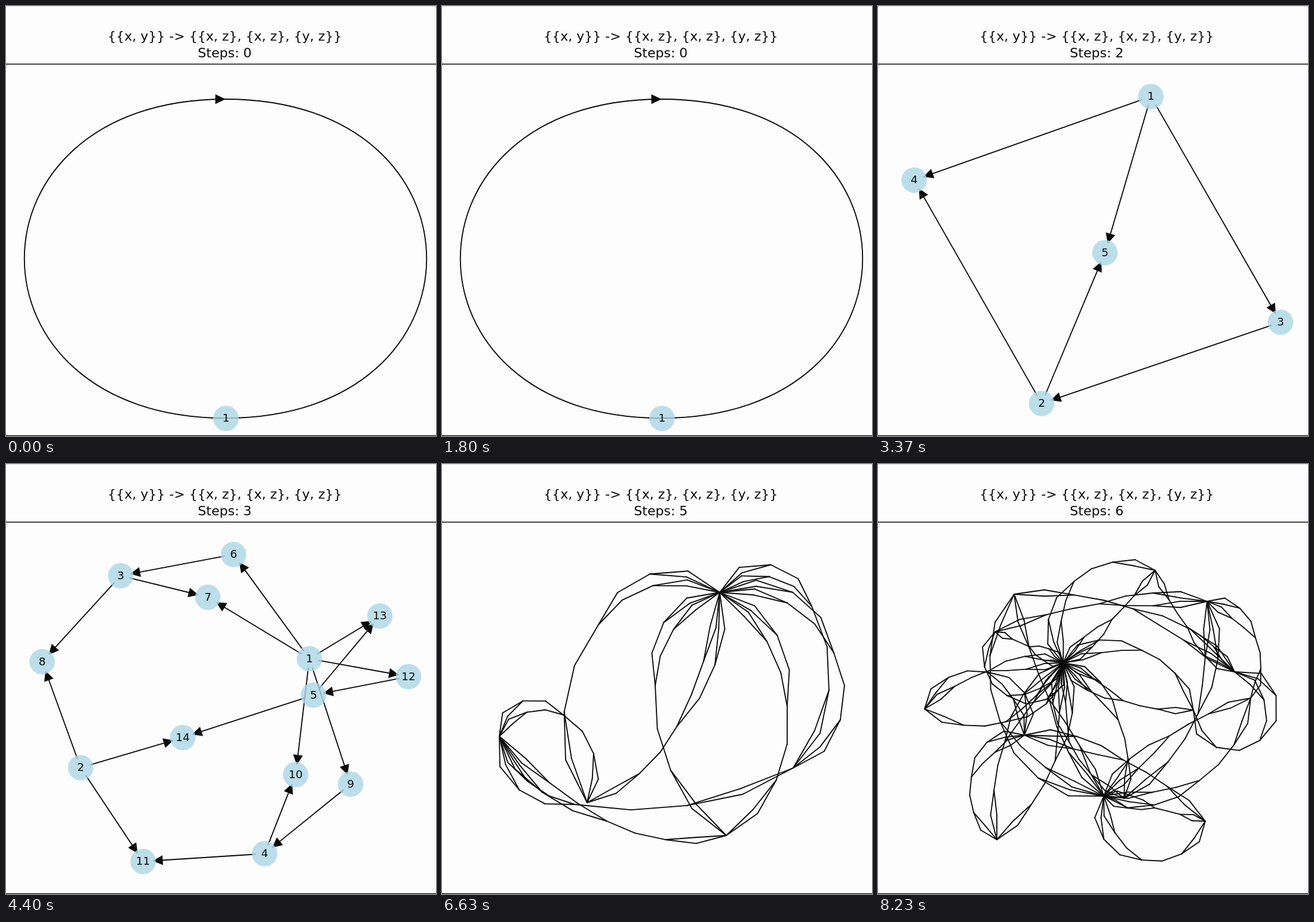
Write an HTML page with a canvas that moves like this. It is 720x720 px and loops after 8.26 s.

```html
<!DOCTYPE html>
<html lang="en">
<head>
<meta charset="utf-8">
<title>Graph rewriting steps</title>
<style>
  html, body { margin: 0; width: 100%; height: 100%; overflow: hidden; background: #fdfdfd; }
  canvas { display: block; width: 720px; height: 720px; }
</style>
</head>
<body>
<canvas id="stage" width="720" height="720"></canvas>
<script>
const ctx = document.getElementById('stage').getContext('2d');
const LOOP = 8260;
const STARTS = [0, 2065, 3100, 4130, 5160, 6600, 7230];
const RULE = '{{x, y}} -> {{x, z}, {x, z}, {y, z}}';
const INK = '#0a0a0a';
const RADIUS = 21.3, SHRINK = 16;

function text(str, x, y, size) {
  ctx.font = size + 'px "DejaVu Sans", sans-serif';
  ctx.fillText(str, x, y);
}

function line([x1, y1], [x2, y2]) {
  ctx.beginPath();
  ctx.moveTo(x1, y1);
  ctx.lineTo(x2, y2);
  ctx.stroke();
}

function head(x, y, angle) {
  ctx.save();
  ctx.translate(x, y);
  ctx.rotate(angle);
  ctx.beginPath();
  ctx.moveTo(0, 0);
  ctx.lineTo(-17, -8.2);
  ctx.lineTo(-17, 8.2);
  ctx.fill();
  ctx.restore();
}

function arrow([x1, y1], [x2, y2]) {
  const a = Math.atan2(y2 - y1, x2 - x1), c = Math.cos(a), s = Math.sin(a);
  line([x1 + SHRINK * c, y1 + SHRINK * s], [x2 - 24 * c, y2 - 24 * s]);
  head(x2 - SHRINK * c, y2 - SHRINK * s, a);
}

function node([x, y], label) {
  ctx.fillStyle = 'rgba(173, 216, 230, .8)';
  ctx.beginPath();
  ctx.arc(x, y, RADIUS, 0, 7);
  ctx.fill();
  ctx.fillStyle = INK;
  text(label, x, y + 5.8, 18.4);
}

function selfLoop() {
  const x = 367.5, top = 156, bottom = 690, reach = 449;
  ctx.beginPath();
  ctx.moveTo(x, top);
  ctx.bezierCurveTo(x + reach, top, x + reach, bottom, x, bottom);
  ctx.bezierCurveTo(x - reach, bottom, x - reach, top, x, top);
  ctx.stroke();
  head(x, top, 0);
  node([368.3, 690.5], 1);
}

// Nodes 1 and 2 are roots; every hub after them joins both.
function hubGraph(nodes) {
  const [one, two, ...hubs] = nodes;
  hubs.forEach((hub, i) => {
    arrow(one, hub);
    i ? arrow(two, hub) : arrow(hub, two);
  });
  nodes.forEach((p, i) => node(p, i + 1));
}

// Each of the three hubs has three arms: two lead to node 1, the last to node 2.
function eachArm(nodes, visit) {
  nodes.slice(5).forEach((arm, i) =>
    visit(arm, nodes[i % 3 < 2 ? 0 : 1], nodes[2 + Math.floor(i / 3)], i % 3));
}

function armGraph(nodes) {
  eachArm(nodes, (arm, root, hub, i) => {
    arrow(root, arm);
    i ? arrow(hub, arm) : arrow(arm, hub);
  });
  nodes.forEach((p, i) => node(p, i + 1));
}

// Bulge of the edge from p to arm, away from the straight way from p to q.
function bulge(p, arm, q) {
  const angle = to => Math.atan2(to[1] - p[1], to[0] - p[0]);
  return Math.tan(0.65 * Math.sin(angle(arm) - angle(q)));
}

// The rewriting rule: put a new node z on every copy of an edge, along an arc.
function split(edges, spread) {
  return edges.flatMap(({ a, b, copies, bend }) => {
    const dx = b[0] - a[0], dy = b[1] - a[1];
    const gap = copies > 1 ? 2 * spread / Math.hypot(dx, dy) : 0;
    return Array.from({ length: copies }, (_, i) => {
      const k = bend + (2 * i - 1) * gap;
      const z = [(a[0] + b[0] - dy * k) / 2, (a[1] + b[1] + dx * k) / 2];
      const half = Math.tan(Math.atan(k) / 2);
      return [
        { a, b: z, copies: 2, bend: half },
        { a: b, b: z, copies: 1, bend: -half }
      ];
    }).flat();
  });
}

// An arm may carry its own bends, towards the root and towards the hub.
function grown(nodes, times, spread) {
  let edges = [];
  eachArm(nodes, (arm, root, hub) => {
    const [, , toRoot = bulge(root, arm, hub), toHub = bulge(hub, arm, root)] = arm;
    edges.push({ a: root, b: arm, copies: 2, bend: toRoot });
    edges.push({ a: hub, b: arm, copies: 1, bend: toHub });
  });
  for (; times--; spread = 1.6 * Math.sqrt(spread)) edges = split(edges, spread);
  edges.forEach(e => line(e.a, e.b));
}

const hubNodes = [[457, 151.5], [274, 665.5], [674, 529.5], [60.5, 291.5], [380, 413]];
const armNodes = [
  [508, 326], [125, 508.5], [192, 187], [433, 652.5], [515, 387],
  [381, 151.5], [338, 223], [60.5, 331],
  [577, 536], [485, 520], [229.5, 665.5],
  [674, 356], [626, 254.5], [296, 458]
];
const fourth = [
  [468, 531], [134, 268], [331, 209], [614, 376], [150, 610],
  [460, 361], [372, 387], [149, 151],
  [628, 479], [634, 543], [354, 275],
  [350, 661], [305, 610], [61, 419]
];
const fifth = [
  [465, 215], [96, 456], [243, 567], [476, 622], [588, 509],
  [262, 269], [393, 440], [203, 420],
  [578, 406], [357, 371], [276, 598],
  [656, 316], [619, 238], [222, 570]
];
const sixth = [
  [310, 333], [378, 556], [551, 230], [597, 348], [245, 454],
  [196, 281, -.7, .12], [412, 560, 0, -.33], [624, 392, .15, -.55],
  [464, 178, -.35, -.15], [528, 412, -.17, -2.4], [228, 218, -.34, .22],
  [78, 410, -.15, 1], [199, 629, 0, .75], [548, 598, .5, -.2]
];

const scenes = [
  selfLoop,
  () => {
    const ends = [[673, 151], [60, 665]];
    arrow(...ends);
    ends.forEach((p, i) => node(p, i + 1));
  },
  () => hubGraph(hubNodes),
  () => armGraph(armNodes),
  () => grown(fourth, 1, 12),
  () => grown(fifth, 2, 10),
  () => grown(sixth, 3, 45)
];

function draw(step) {
  ctx.fillStyle = '#fdfdfd';
  ctx.fillRect(0, 0, 720, 720);
  ctx.fillStyle = '#dcdcdc';
  ctx.fillRect(0, 0, 720, 1);
  ctx.fillStyle = ctx.strokeStyle = INK;
  ctx.fillRect(0, 96.6, 720, 1.5);
  ctx.fillRect(0, 718.8, 720, 1.2);
  ctx.lineWidth = 1.85;
  ctx.lineCap = 'round';
  ctx.textAlign = 'center';
  text(RULE, 366.3, 58.3, 22);
  text('Steps: ' + step, 366.3, 86.2, 22);
  scenes[step]();
}

let shown = -1;
function tick() {
  const t = performance.now() % LOOP;
  const step = STARTS.filter(s => s <= t).length - 1;
  if (step !== shown) draw(shown = step);
  requestAnimationFrame(tick);
}
tick();
</script>
</body>
</html>
```
